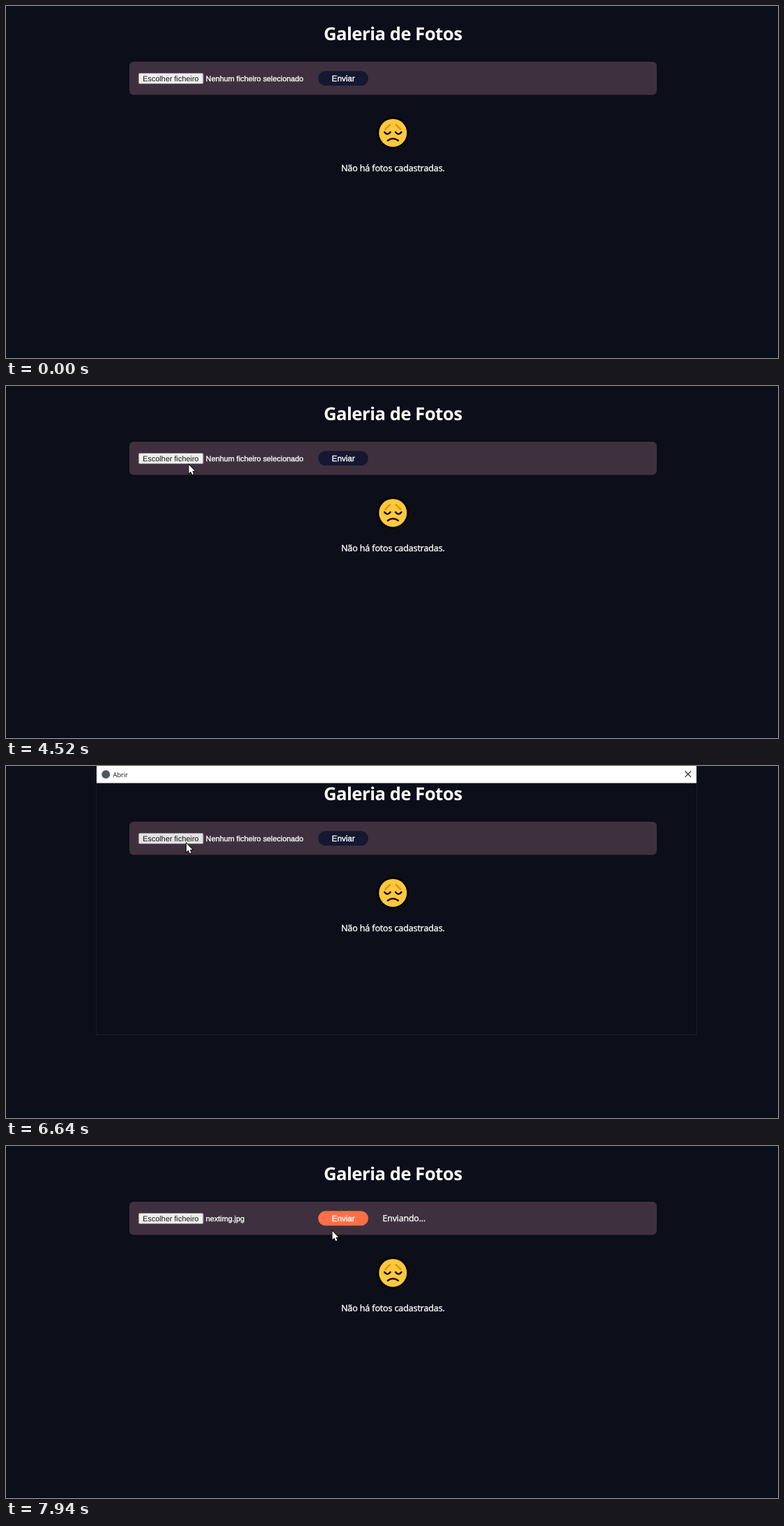
These frames come from a looping animation (1108x505 px, 8000 ms). An HTML page:

```html
<!DOCTYPE html>
<html lang="pt">
<head>
<meta charset="utf-8">
<title>Galeria de Fotos</title>
<style>
html, body { margin: 0; width: 100%; height: 100%; overflow: hidden; background: #0c0e1a; }
svg { display: block; width: 1108px; height: 505px; }
text { fill: #fff; text-rendering: geometricPrecision; }
.ui { font: 12.6px "Open Sans", "Noto Sans", sans-serif; letter-spacing: -.0127em; }
.title { font: bold 25.6px "Open Sans", "Noto Sans", sans-serif; letter-spacing: -.0177em; }
.form { font: 10.86px "Liberation Sans", Arial, sans-serif; }
.firm { stroke: #fff; stroke-width: .35; }
.dark { fill: #111; }
.mid { text-anchor: middle; }
.line { fill: none; stroke-linecap: round; stroke-linejoin: round; }
</style>
</head>
<body>
<svg viewBox="0 0 1108 505">
  <rect width="1108" height="505" fill="#0c0e1a"/>
  <rect y="504" width="1108" height="1" fill="#04050a"/>
  <text class="title mid" x="555.3" y="49">Galeria de Fotos</text>

  <rect x="177" y="80" width="757" height="47.5" rx="6" fill="#3f303f"/>
  <rect id="choose" x="190.5" y="96.5" width="92.5" height="15" rx="1.5" stroke="#8b898b"/>
  <text class="form dark" x="196.3" y="108">Escolher ficheiro</text>
  <text id="file" class="form firm" x="286.8" y="108"></text>
  <rect id="send" x="448" y="93.3" width="72" height="21" rx="10.5"/>
  <text class="form firm" x="467.6" y="108" style="font-size:11.7px">Enviar</text>
  <text id="sending" class="ui firm" x="540.5" y="108" style="font-size:12.4px">Enviando...</text>

  <g id="sad">
    <circle cx="555.3" cy="182" r="22.8" fill="#000"/>
    <circle cx="555.3" cy="182" r="20" fill="#ffc83d"/>
    <g class="line" stroke-width="2.6">
      <path d="M544.5 177 551 170.3M559.7 170.3 566.2 177" stroke="#d99a1c"/>
      <path d="M543.3 181Q547.3 186.5 551.5 181M559.2 181Q563.3 186.5 567.4 181M548 193Q555.3 187.5 562.8 193" stroke="#150d08"/>
    </g>
  </g>

  <g id="sheep">
    <g class="line" stroke="#000" stroke-width="6">
      <path d="M551.5 192V203M570.5 192V203"/>
      <use href="#wool"/>
      <use href="#face"/>
    </g>
    <path d="M549.5 191h4.5v3l-1 10h-3zM568.5 190h4.5v14h-3z" fill="#85817f"/>
    <path id="wool" fill="#fff" d="M541 173Q542 168 546 169.5Q550 168 552.5 172Q557 171 559.5 174.5H571Q577 175 577 181V188Q575 193 569 191.5Q565 195.5 560 193.5Q555 196.5 550 194Q543.5 194 543.5 188Q541 185 543 181Z"/>
    <path id="face" fill="#85817f" d="M542 172 549.5 173 549 178 545.5 180Q542 180 540 181.5Q536.5 181.5 536.5 178.5Z"/>
    <circle cx="543.3" cy="175.8" r="1.1" fill="#222"/>
  </g>
  <text id="status" class="ui firm mid" x="555.4" y="237"></text>

  <g id="dialog">
    <path d="M129.5 24V385.5H991.5V24" fill="none" stroke="#1b1d2a"/>
    <rect x="130" width="861" height="24.5" fill="#fff"/>
    <circle cx="143.3" cy="12" r="6" fill="#4c5964"/>
    <text class="ui dark" x="153.6" y="15.7" style="font-size:9.4px">Abrir</text>
    <path d="M974.7 7.5 983 15.8M983 7.5 974.7 15.8" stroke="#222" stroke-width="1.1"/>
  </g>

  <g id="cursor">
    <path d="M0 0V12.3L2.8 9.8 4.8 14.2 6.8 13.3 4.9 9H8.6Z" fill="#fff" stroke="#000" stroke-width="1.6" paint-order="stroke"/>
    <g id="busy" class="line" stroke-width="2.7">
      <circle cx="12" cy="0" r="4.6" stroke="#1c7fe0"/>
      <path id="arc" d="M12 -4.6A4.6 4.6 0 0 1 16.6 0" stroke="#6fc3f7"/>
    </g>
  </g>
</svg>
<script>
const LOOP = 8000;
const $ = id => document.getElementById(id);

// The pointer eases along each glide and rests at its end until the next one.
const glides = [
  { start: 70, end: 240, from: [579, 193], to: [579, 193] },
  { start: 240, end: 350, from: [579, 193], to: [200, -90] },
  { start: 2040, end: 2780, from: [418, 28], to: [512, 163] },
  { start: 3690, end: 4450, from: [512, 163], to: [262.5, 113] },
  { start: 4520, end: 5260, from: [262.5, 113], to: [249, 101] },
  { start: 5600, end: 6640, from: [259, 111], to: [259, 111] },
  { start: 6730, end: 7390, from: [403, 189], to: [478, 112] },
  { start: 7460, end: 7940, from: [478, 112], to: [468.5, 122] }
];

const within = (t, a, b) => t >= a && t < b;
const progress = (t, a, b) => Math.max(0, Math.min(1, (t - a) / (b - a)));
const ease = p => p * p * (3 - 2 * p);
const mix = (a, b, p) => a.map((v, i) => v + (b[i] - v) * p);
const show = (id, on) => $(id).style.display = on ? '' : 'none';

function movePointer(t) {
  const glide = glides.findLast(g => t >= g.start);
  show('cursor', glide);
  if (!glide) return;
  const p = ease(progress(t, glide.start, glide.end));
  $('cursor').setAttribute('transform', `translate(${mix(glide.from, glide.to, p)})`);
  show('busy', within(t, 5600, 6290));
  $('arc').setAttribute('transform', `rotate(${t * .36} 12 0)`);
}

function draw(t) {
  const loading = within(t, 3240, 3690);
  show('sad', !loading);
  show('sheep', loading);
  $('status').textContent = loading ? 'Carregando...' : 'Não há fotos cadastradas.';

  $('choose').setAttribute('fill', within(t, 4610, 7190) ? '#e3e3e3' : '#efefef');
  $('file').textContent = t < 7190 ? 'Nenhum ficheiro selecionado' : 'nextimg.jpg';

  const glow = progress(t, 7380, 7540);
  $('send').setAttribute('fill', `rgb(${mix([21, 24, 48], [255, 111, 71], glow)})`);
  show('sending', t >= 7780);
  show('dialog', within(t, 6640, 6730));
  movePointer(t);
}

const began = performance.now();
function tick() {
  draw((performance.now() - began) % LOOP);
  requestAnimationFrame(tick);
}
tick();
</script>
</body>
</html>
```
